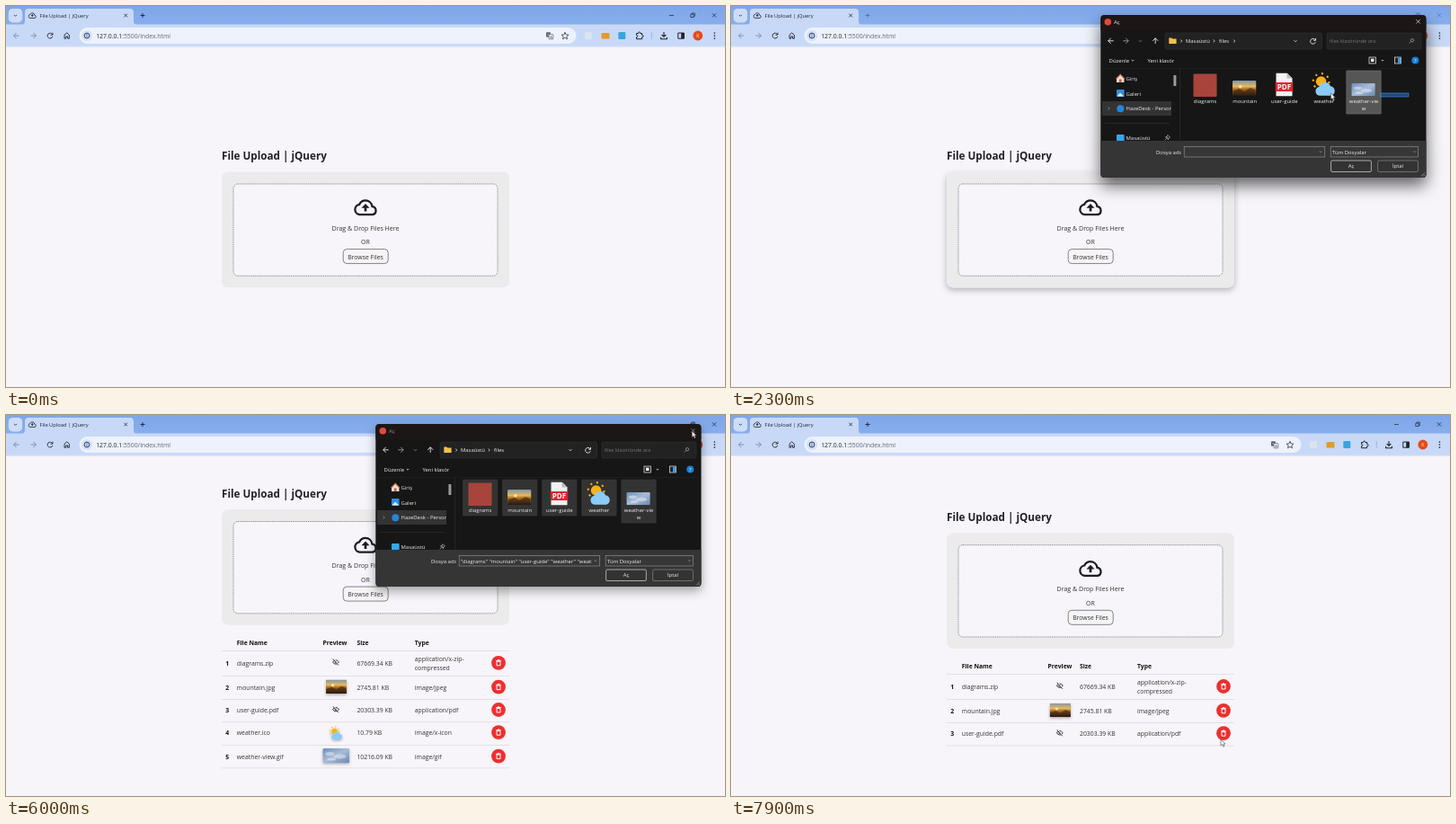
These frames come from a looping animation (800 px wide and 424 px high, 8 s). An HTML page:

```html
<!DOCTYPE html>
<html lang="en">
<head>
<meta charset="utf-8">
<title>File Upload | jQuery</title>
<style>
html, body { margin: 0; width: 100%; height: 100%; overflow: hidden; background: #f7f5fa; }
svg { display: block; }
text { font-family: "Open Sans", "Noto Sans", sans-serif; white-space: pre; }
</style>
</head>
<body>
<svg id="stage" width="100%" height="100%" viewBox="0 0 800 424" xmlns="http://www.w3.org/2000/svg"></svg>
<script>
const LOOP = 8000;
const stage = document.getElementById('stage');

const rect = (x, y, w, h, fill, rx = 0, extra = '') =>
  `<rect x="${x}" y="${y}" width="${w}" height="${h}" rx="${rx}" fill="${fill}" ${extra}/>`;
const text = (x, y, s, size, fill = '#333', extra = '') =>
  `<text x="${x}" y="${y}" font-size="${size}" fill="${fill}" ${extra}>${s}</text>`;
const line = (d, color, w = 0.9, extra = '') =>
  `<path d="${d}" fill="none" stroke="${color}" stroke-width="${w}" ${extra}/>`;
const circle = (x, y, r, fill, extra = '') => `<circle cx="${x}" cy="${y}" r="${r}" fill="${fill}" ${extra}/>`;
const group = (id, body, extra = '') => `<g id="${id}" ${extra}>${body}</g>`;
const icon = (id, x, y, w, h = w) => `<use href="#${id}" x="${x}" y="${y}" width="${w}" height="${h}"/>`;
const chevron = (x, y, color, turn = 0, s = 1.5) =>
  line(`M${-s} ${-s / 2}l${s} ${s}l${s} ${-s}`, color, 0.8, `transform="translate(${x} ${y}) rotate(${turn})"`);
const arrow = (x, y, color, turn = 0) =>
  line('M3 0H-3M0 -3L-3 0L0 3', color, 0.9, `transform="translate(${x} ${y}) rotate(${turn})"`);
const cross = (x, y, s, color, w = 0.8) =>
  line(`M${x - s} ${y - s}l${2 * s} ${2 * s}m0 ${-2 * s}l${-2 * s} ${2 * s}`, color, w);
const reload = (x, y, color) =>
  line(`M${x + 2.6} ${y - 1.3}A2.9 2.9 0 1 0 ${x + 2.8} ${y + 1}M${x + 3} ${y - 3.3}v2.4h-2.4`, color, 0.9);
const bold = 'font-weight="700"', mid = 'text-anchor="middle"';

const CLOUD = 'M18.6 10.9A6.8 6.8 0 0 0 12 5C9.3 5 7.1 6.5 6 8.9A5.1 5.1 0 0 0 6.1 19H18.9A4.1 4.1 0 0 0 18.6 10.9Z';

const defs = `<defs>
  <linearGradient id="sunset" x2="0" y2="1">
    <stop offset="0" stop-color="#7d97a8"/><stop offset=".38" stop-color="#e9b75e"/>
    <stop offset=".55" stop-color="#b0701f"/><stop offset="1" stop-color="#2a1a10"/>
  </linearGradient>
  <linearGradient id="sky" x2="1" y2="1">
    <stop offset="0" stop-color="#6d8fbd"/><stop offset=".5" stop-color="#a9bcd6"/><stop offset="1" stop-color="#6787b5"/>
  </linearGradient>
  <linearGradient id="strip" x2="0" y2="1">
    <stop offset="0" stop-color="#7fa6e8"/><stop offset="1" stop-color="#88aeee"/>
  </linearGradient>
  <filter id="soft" x="-20%" y="-20%" width="140%" height="160%">
    <feDropShadow dx="0" dy="3" stdDeviation="3.5" flood-opacity=".28"/></filter>
  <filter id="deep" x="-20%" y="-20%" width="140%" height="160%">
    <feDropShadow dx="0" dy="9" stdDeviation="9" flood-opacity=".6"/></filter>
  <filter id="light" x="-20%" y="-20%" width="140%" height="160%">
    <feDropShadow dx="0" dy="5" stdDeviation="6" flood-opacity=".35"/></filter>
  <filter id="thumb" x="-40%" y="-40%" width="180%" height="220%">
    <feDropShadow dx="0" dy="1.5" stdDeviation="1.5" flood-opacity=".3"/></filter>
  <symbol id="cloudUp" viewBox="0 0 24 24">
    ${line(CLOUD, '#1c1c22', 2)}<path d="M12 8.2l4 4.2h-2.8v3.4h-2.4v-3.4H8z" fill="#1c1c22"/></symbol>
  <symbol id="weatherIcon" viewBox="0 0 24 24">
    ${circle(9.5, 9, 5, '#fbb117')}
    ${circle(9.5, 9, 7.6, 'none', 'stroke="#fbb117" stroke-width="1.8" stroke-dasharray="1.8 4.17"')}
    <path d="M8 22.5a4.2 4.2 0 0 1-.3-8.3 5.6 5.6 0 0 1 10.7-.8A4.7 4.7 0 0 1 19.3 22.5z" fill="#8ccbf7"/></symbol>
  <symbol id="mountainPic" viewBox="0 0 24 15" preserveAspectRatio="none">
    ${rect(0, 0, 24, 15, 'url(#sunset)', 1.2)}${circle(8, 6, 1.6, '#ffe9a6')}
    <path d="M1 15V10l6-2 5 2.5 6-3.5 5 2v6z" fill="#2a1c12" opacity=".55"/></symbol>
  <symbol id="skyPic" viewBox="0 0 30 16" preserveAspectRatio="none">
    ${rect(0, 0, 30, 16, 'url(#sky)', 1.5)}
    <g fill="#dde6f1" opacity=".6"><ellipse cx="8" cy="6" rx="5" ry="2"/><ellipse cx="19" cy="9" rx="7" ry="2.4"/><ellipse cx="10" cy="12" rx="5" ry="1.6"/></g></symbol>
  <symbol id="pdfIcon" viewBox="0 0 20 26">
    <path d="M1 0h12l6 6v20H1z" fill="#f2f2f2"/><path d="M13 0l6 6h-6z" fill="#bbb"/>
    ${rect(0, 10.5, 20, 10, '#e0232e')}${text(10, 18.6, 'PDF', 8, '#fff', bold + mid)}</symbol>
  <symbol id="hidden" viewBox="0 0 10 10">
    ${line('M.8 5Q5 -.2 9.2 5Q5 10.2 .8 5z', '#222', 1.1)}${circle(5, 5, 1.5, '#222')}
    ${line('M2 .8L8.8 9', '#f7f5fa', 2)}${line('M1.4 1L8.4 9.2', '#222', 1.1)}</symbol>
</defs>`;

function browser() {
  const ink = '#1f2430';
  return rect(0, 0, 800, 22, 'url(#strip)') + rect(0, 20.5, 800, 25, '#c8d9f7') +
    rect(0, 44.8, 800, 0.6, '#dfe6f3') +
    rect(2.8, 3, 15.4, 15.4, '#cddcf8', 4.5) + chevron(10.5, 10.6, ink) +
    `<path d="M17 21q4 0 4-4V7q0-4 4-4H138q4 0 4 4v10q0 4 4 4z" fill="#c8d9f7"/>` +
    icon('cloudUp', 24.4, 5.8, 9.6) + text(37.5, 12.8, 'File Upload | jQuery', 5.75, ink) +
    cross(133.2, 10.5, 1.8, ink) +
    group('frameButtons', line('M149.5 10.5h5M152 8v5', ink) + line('M738 10.5h5', ink, 0.7) +
      line('M761.8 9.2h3.3v3.3h-3.3zM763 9v-1h3.3v3.4h-1', ink, 0.7) + cross(788, 10.4, 2.2, ink, 0.7)) +
    arrow(11.5, 33, '#7d8798') + arrow(30.5, 33, '#7d8798', 180) + reload(49, 33, ink) +
    line('M65 36.2v-4l2.7-2.4 2.7 2.4v4h-1.8v-2.3h-1.8v2.3z', ink) +
    rect(81.5, 24, 553, 18, '#edf2fc', 9) + circle(90, 33, 6, '#d3e1fa') +
    circle(90, 33, 2.9, 'none', 'stroke="#1d2a55" stroke-width=".9"') + line('M90 32.5v2M90 31v.8', '#1d2a55', 0.8) +
    text(100.2, 35.6, '127.0.0.1<tspan fill="#616874">:5500/index.html</tspan>', 6.85, ink) +
    rect(601, 29.3, 4.8, 5.3, '#596273', 0.6) + rect(604, 31.6, 4.8, 5.3, '#edf2fc', 0.6, 'stroke="#444b58" stroke-width=".6"') +
    text(606.4, 36, 'A', 4, '#444b58', mid) + text(603.3, 33.3, 'x', 4, '#fff', mid) +
    line('M622 29.2l1.1 2.7 2.9.2-2.2 1.9.7 2.8-2.5-1.5-2.5 1.5.7-2.8-2.2-1.9 2.9-.2z', '#333b49', 0.8) +
    rect(644, 29, 8, 8, '#dbe3ee', 1.5) + rect(662.5, 30, 9, 6.5, '#e39a2c', 1) + rect(681.3, 29, 8, 8, '#37a5e0', 1) +
    line('M701.5 30.5h2q0-1.6 1.1-1.6t1.1 1.6h2v2q1.5 0 1.5 1.1t-1.5 1.1v2h-6.2v-2q1.3 0 1.3-1.1t-1.3-1.1z', ink, 1) +
    rect(717.8, 29, 0.8, 8, '#8aaee6') + line('M732 29v5M729.7 32l2.3 2.3 2.3-2.3M728.6 34.8v2h6.8v-2', ink, 1.1) +
    line('M747.8 30h6.6v6.2h-6.6z', ink, 1) + rect(751.2, 30, 3.3, 6.2, ink) +
    circle(769.8, 33, 5.4, '#e64a19') + text(769.8, 35, 'K', 5, '#fff', mid) +
    [30, 33, 36].map(y => circle(788.4, y, 0.85, ink)).join('');
}

function uploadCard() {
  const dropZone = rect(253, 198, 294, 102.3, '#f7f5fa', 5, 'stroke="#666" stroke-width=".8" stroke-dasharray="1 .9"');
  return text(240, 171, 'File Upload | jQuery', 11.7, '#212126', bold) +
    group('cardShadow', rect(240, 184.5, 320, 128.7, '#ebebec', 7), 'filter="url(#soft)"') +
    rect(240, 184.5, 320, 128.7, '#ebebec', 7) + dropZone + icon('cloudUp', 386.5, 210.8, 27) +
    text(400, 249.6, 'Drag &amp; Drop Files Here', 7.05, '#333', mid) + text(400, 265.2, 'OR', 7, '#333', mid) +
    rect(375.2, 270.6, 50, 16, '#f5f5f6', 4, 'stroke="#666" stroke-width=".8"') +
    text(400, 281.5, 'Browse Files', 6.9, '#333', mid);
}

const eye = y => icon('hidden', 362.8, y - 5.2, 8.4);
const files = [
  { name: 'diagrams.zip', size: '67669.34 KB', type: ['application/x-zip-', 'compressed'], y: 276.2, end: 290.2, pic: eye(276) },
  { name: 'mountain.jpg', size: '2745.81 KB', type: ['image/jpeg'], y: 303, end: 316, pic: icon('mountainPic', 355.7, 294.5, 23.6, 15.4) },
  { name: 'user-guide.pdf', size: '20303.39 KB', type: ['application/pdf'], y: 328.4, end: 341.5, pic: eye(328.6) },
  { name: 'weather.ico', size: '10.79 KB', type: ['image/x-icon'], y: 353.6, end: 367, pic: icon('weatherIcon', 359.2, 346, 16) },
  { name: 'weather-view.gif', size: '10216.09 KB', type: ['image/gif'], y: 380, end: 392.6, pic: icon('skyPic', 352.3, 371, 30, 16) },
];

function fileRow(f, i) {
  const base = f.y + 2.6, s = 6.85;
  const typeTop = f.type.length > 1 ? base - 4.8 : base;
  const bin = circle(548, f.y - 0.4, 7.9, '#ee2f2f') +
    line(`M546 ${f.y - 2}h4v4.6h-4zM545.2 ${f.y - 2.8}h5.6M547 ${f.y - 3.6}h2`, '#fff', 1);
  return group('row' + i, text(244.3, base, i + 1, s, '#111', bold) + text(256.8, base, f.name, s) +
    `<g class="pic" ${/eye|hidden/.test(f.pic) ? '' : 'filter="url(#thumb)"'}>${f.pic}</g>` +
    `<g class="size">${text(390.4, base, f.size, s)}</g>` +
    `<g class="type">${f.type.map((v, k) => text(454.8, typeTop + k * 9.6, v, s)).join('')}</g>` +
    bin + rect(240, f.end, 320, 0.6, '#d4d3d8'));
}

function fileTable() {
  const head = (x, s) => text(x, 256, s, 6.8, '#111', bold);
  return head(256.8, 'File Name') + head(352.6, 'Preview') + `<g class="size">${head(390.4, 'Size')}</g>` +
    `<g class="type">${head(454.8, 'Type')}</g>` + rect(240, 262, 320, 0.6, '#d4d3d8') + files.map(fileRow).join('');
}

const tiles = [
  { label: ['diagrams'], art: rect(514.5, 75.5, 26, 25.5, '#a8443c', 1) },
  { label: ['mountain'], art: icon('mountainPic', 558, 83, 26.5, 17) },
  { label: ['user-guide'], art: icon('pdfIcon', 605.5, 74.5, 20, 26) },
  { label: ['weather'], art: icon('weatherIcon', 645, 73.5, 29, 28) },
  { label: ['weather-vie', 'w'], art: icon('skyPic', 690.3, 86, 26.5, 14.3) },
].map((tile, i) => ({ ...tile, x: 508.4 + i * 44.1 }));

function dialog() {
  const white = '#eee', grey = '#999', s = 5.95;
  const box = (x, y, w, h, fill, stroke, rx = 0) => rect(x, y, w, h, fill, rx, `stroke="${stroke}" stroke-width=".7"`);
  const shell = rect(411.3, 10.2, 362.2, 180.8, '#191919', 4) +
    `<path d="M411.3 27V14q0-4 4-4h354q4 0 4 4v13z" fill="#1d1916"/>` +
    `<path d="M411.3 150h362.2v37q0 4-4 4h-354q-4 0-4-4z" fill="#343434"/>` +
    circle(419.3, 17.7, 3.8, '#e0483b') +
    group('caption', text(426, 19.8, 'Aç', s, white) + cross(764.6, 17.3, 2.2, white, 0.7));

  const blank = rect(411.5, 26.5, 362, 123.5, '#fff') + rect(412.5, 69, 86, 81, '#151515') +
    rect(492.2, 77, 3, 11, '#999') + [[472, 158, 28, 7.6], [503.3, 156.3, 157.2, 11.7], [667, 156.3, 97.5, 11.7],
      [667, 171.3, 45.8, 13.4], [718.6, 171.3, 45.8, 13.4], [764.5, 182.6, 8.6, 8.2]]
      .map(b => rect(...b, '#fff')).join('');

  const bars = arrow(422.7, 38.8, white) + arrow(439.2, 38.8, grey, 180) + chevron(455.5, 39, grey) +
    arrow(472.2, 38.8, white, 90) + box(483, 30, 174.5, 18, '#222', '#303030', 1.5) +
    `<path d="M487.3 35.5h3l1 1h4.3v5.4h-8.3z" fill="#f5c145"/>` + chevron(501, 39, white, -90) +
    text(506, 41, 'Masaüstü', 5.9, white) + chevron(537.5, 39, white, -90) + text(543, 41, 'files', 5.9, white) +
    group('pathEnd', chevron(560, 39, white, -90)) + chevron(628, 39, white) + reload(647.5, 39.2, white) +
    box(663, 30, 105, 18, '#222', '#303030', 1.5) + text(666, 41.1, 'files klasöründe ara', 5.6, '#777') +
    circle(758, 38.2, 1.7, 'none', 'stroke="#aaa" stroke-width=".7"') + line('M756.8 39.5l-2 2', '#aaa', 0.7) +
    text(420.6, 62.8, 'Düzenle', s, white) + chevron(447, 60.6, white, 0, 1.2) + text(463.4, 62.8, 'Yeni klasör', s, white) +
    box(710, 57, 7.5, 7, '#222', white) + rect(712, 58.6, 3.5, 3.4, white) + chevron(725, 60.6, white, 0, 1.2) +
    box(738.5, 57, 7, 7, '#222', white) + rect(742, 57.4, 3.2, 6.4, '#3b9be6') +
    circle(761.3, 60.5, 4, '#1681d8') + text(761.3, 62.7, '?', 6, '#fff', mid) + rect(411.3, 69, 362.2, 0.5, '#262626');

  const sidebar = `<svg x="411.3" y="69" width="78.7" height="81" viewBox="411.3 69 78.7 81">` +
    `<path d="M429 81l4.2-4.5 4.2 4.5v4h-8.4z" fill="#e6e0da"/>` + line('M428.5 81.2l4.7-4.8 4.7 4.8', '#e2724c', 1.2) +
    rect(431.8, 81.5, 2.8, 3.6, '#c0673f') +
    text(439.5, 83.1, 'Giriş', s, white) + rect(429, 93, 8.6, 8, '#2c8fe0', 1) +
    `<path d="M429.5 100.5l3.5-4 4.2 4z" fill="#d7effd"/>` + text(439.5, 99.6, 'Galeri', s, white) +
    rect(413, 106, 78, 16, '#333') + chevron(420.5, 114, grey, -90) + circle(433.3, 114.2, 4, '#2387d8') +
    text(439.5, 116.2, 'HazeDesk - Personal', s, white) + rect(416, 130, 72, 0.6, '#333') +
    rect(429, 143, 8.6, 8, '#35a6ea', 1) + text(439.5, 149.3, 'Masaüstü', s, white) +
    line('M484 145l3 3M486 143.6l2.4 2.4-1.5 1-.4 1.8-3-3 1.7-.4zM484.7 147.4l-2 2', '#aaa', 0.8) + '</svg>' +
    rect(492.4, 77, 3, 12, '#9a9a9a', 0.5) + rect(499.2, 69, 0.6, 81, '#303030');

  const grid = tiles.map((t, i) => rect(t.x, 72, 38.4, 40 + 8 * (t.label.length - 1), '#555', 0.5,
    `id="tile${i}" stroke-width=".6"`) + t.art +
    t.label.map((v, k) => text(t.x + 19.2, 108.1 + k * 8.2, v, s, white, mid)).join('')).join('');

  const footer = text(473, 164.5, 'Dosya adı:', s, white) + box(504.2, 156.4, 156.5, 11.6, '#373737', '#8a8a8a') +
    `<svg x="505" y="157" width="146.5" height="11" viewBox="505 157 146.5 11">` +
    group('chosen', text(506, 164.5, tiles.map(t => `"${t.label.join('')}"`).join(' '), s, white)) + '</svg>' +
    chevron(656, 162.2, grey, 0, 1.3) + box(667.2, 156.4, 97.4, 11.6, '#373737', '#8a8a8a') +
    text(669, 164.5, 'Tüm Dosyalar', s, white) + chevron(760.5, 162.2, grey, 0, 1.3) +
    box(667.6, 172, 44.8, 12.5, '#333', '#ddd', 1.5) + text(690, 180.4, 'Aç', s, white, mid) +
    box(719.6, 172, 44.8, 12.5, '#333', '#8a8a8a', 1.5) + text(742, 180.4, 'İptal', s, white, mid) +
    line('M768 189.5l4-4M770.3 189.5l1.7-1.7', grey, 0.8);

  return group('shell', shell, 'filter="url(#deep)"') + group('blank', blank) +
    group('content', bars + sidebar + grid + footer) +
    rect(0, 0, 0, 0, '#2b7bd0', 0, 'id="marquee" fill-opacity=".5" stroke="#3c93ea" stroke-width=".6"');
}

// Drawn relative to the pointer tip.
const ghost = rect(-15, -64, 53, 53, '#f4f2f5', 1.5, 'stroke="#222" stroke-width=".9" fill-opacity=".9"') +
  rect(-9.5, -58.5, 44, 43, '#a8443c', 1, 'opacity=".9"') + rect(7.5, -43.5, 8, 10, '#1673c9', 0, 'stroke="#fff" stroke-width=".5"') +
  text(11.5, -36, '5', 6.5, '#fff', mid) + rect(17.5, -10, 36, 11, '#fbfaff', 1, 'opacity=".85"') +
  line('M19.5 -4.5h7M23 -8v7', '#333', 0.8) + text(28, -2.3, 'Kopyala', 5.9, '#2b4a97');

const pointer = '<path d="M0 0v7l1.6-1.4 1.2 2.6 1.2-.6-1.2-2.5h2.1z" fill="#fff" stroke="#444" stroke-width=".6"/>';

stage.innerHTML = defs + rect(0, 0, 800, 424, '#f7f5fa') + group('card', uploadCard()) + group('table', fileTable()) +
  browser() + group('dialog', dialog()) + group('ghost', ghost) + group('pointer', pointer);

const el = Object.fromEntries([...stage.querySelectorAll('[id]')].map(n => [n.id, n]));
const show = (node, on) => node.setAttribute('display', on ? 'inline' : 'none');
const set = (node, attrs) => Object.entries(attrs).forEach(([k, v]) => node.setAttribute(k, v));
const clamp = v => Math.max(0, Math.min(1, v));

// time, x, y
const trail = [
  [0, 806, 250], [250, 640, 275], [500, 430, 284], [700, 412, 280], [900, 416, 272], [1300, 457.5, 264],
  [1700, 560, 170], [2100, 754, 101], [2300, 668, 97], [2600, 506, 78], [2800, 527, 90], [3000, 527, 93],
  [3400, 449, 271], [3700, 440, 269], [5300, 438, 267.5], [5800, 764, 17], [6000, 764, 17],
  [6300, 542, 233], [6700, 546, 378], [7050, 546, 378], [7300, 545, 361], [LOOP, 545, 361],
];

function pointerAt(t) {
  const i = Math.max(1, trail.findIndex(k => k[0] >= t));
  const [t0, x0, y0] = trail[i - 1], [t1, x1, y1] = trail[i];
  const u = clamp((t - t0) / (t1 - t0));
  return [x0 + (x1 - x0) * u, y0 + (y1 - y0) * u];
}

function drawDialog(t) {
  const open = t >= 1200 && t < 6400, focused = t < 3700;
  show(el.dialog, open);
  if (!open) return;
  const closing = (t - 6200) / 100;
  const scale = closing > 0 ? 1 - 0.05 * closing : 0.962 + 0.038 * clamp((t - 1200) / 200);
  const opacity = closing > 0 ? clamp(1 - closing * 0.92) : clamp((t - 1150) / 150);
  set(el.dialog, { opacity, transform: `translate(592 100.5) scale(${scale}) translate(-592 -100.5)` });
  set(el.shell, { filter: focused ? 'url(#deep)' : 'url(#light)' });
  set(el.caption, { opacity: focused ? 1 : 0.55 });
  show(el.blank, t < 1400);
  show(el.content, t >= 1400);
  show(el.pathEnd, focused);

  const [mx, my] = pointerAt(t - 128);
  const sweeping = t >= 2228 && t < 2750;
  show(el.marquee, sweeping);
  if (sweeping) set(el.marquee, { x: mx, y: Math.min(my, 97), width: 754 - mx, height: 101 - Math.min(my, 97) });
  const swept = tile => t >= 2750 || (sweeping && mx < tile.x + 38);
  tiles.forEach((tile, i) => {
    show(el['tile' + i], swept(tile));
    set(el['tile' + i], { fill: focused ? '#565656' : '#333', stroke: focused ? '#777' : '#3c3c3c' });
  });
  show(el.chosen, t >= 2750);
}

function draw(t) {
  const rows = t < 3800 ? 0 : t < 7000 ? 5 : t < 7500 ? 4 : 3;
  const shift = (5 - rows) * 13.1;
  set(el.card, { transform: `translate(0 ${rows ? shift - 79.5 : 0})` });
  set(el.table, { transform: `translate(0 ${shift})` });
  show(el.table, rows > 0);
  files.forEach((f, i) => show(el['row' + i], i < rows));
  const narrow = rows < 5;
  for (const [name, dx] of [['pic', -1.2], ['size', -2.4], ['type', -2.8]])
    el.table.querySelectorAll('.' + name).forEach(n => set(n, { transform: `translate(${narrow ? dx : 0} 0)` }));

  set(el.cardShadow, { opacity: clamp((t - 350) / 200) * clamp((3900 - t) / 150) });
  set(el.frameButtons, { opacity: t >= 900 && t < 3700 ? 0.4 : 1 });
  drawDialog(t);

  const place = { transform: `translate(${pointerAt(t).map(v => v.toFixed(2))})` };
  set(el.pointer, place);
  set(el.ghost, place);
  show(el.ghost, t >= 2950 && t < 3700);
}

const start = performance.now();
function tick() {
  draw((performance.now() - start) % LOOP);
  requestAnimationFrame(tick);
}
tick();
</script>
</body>
</html>
```
